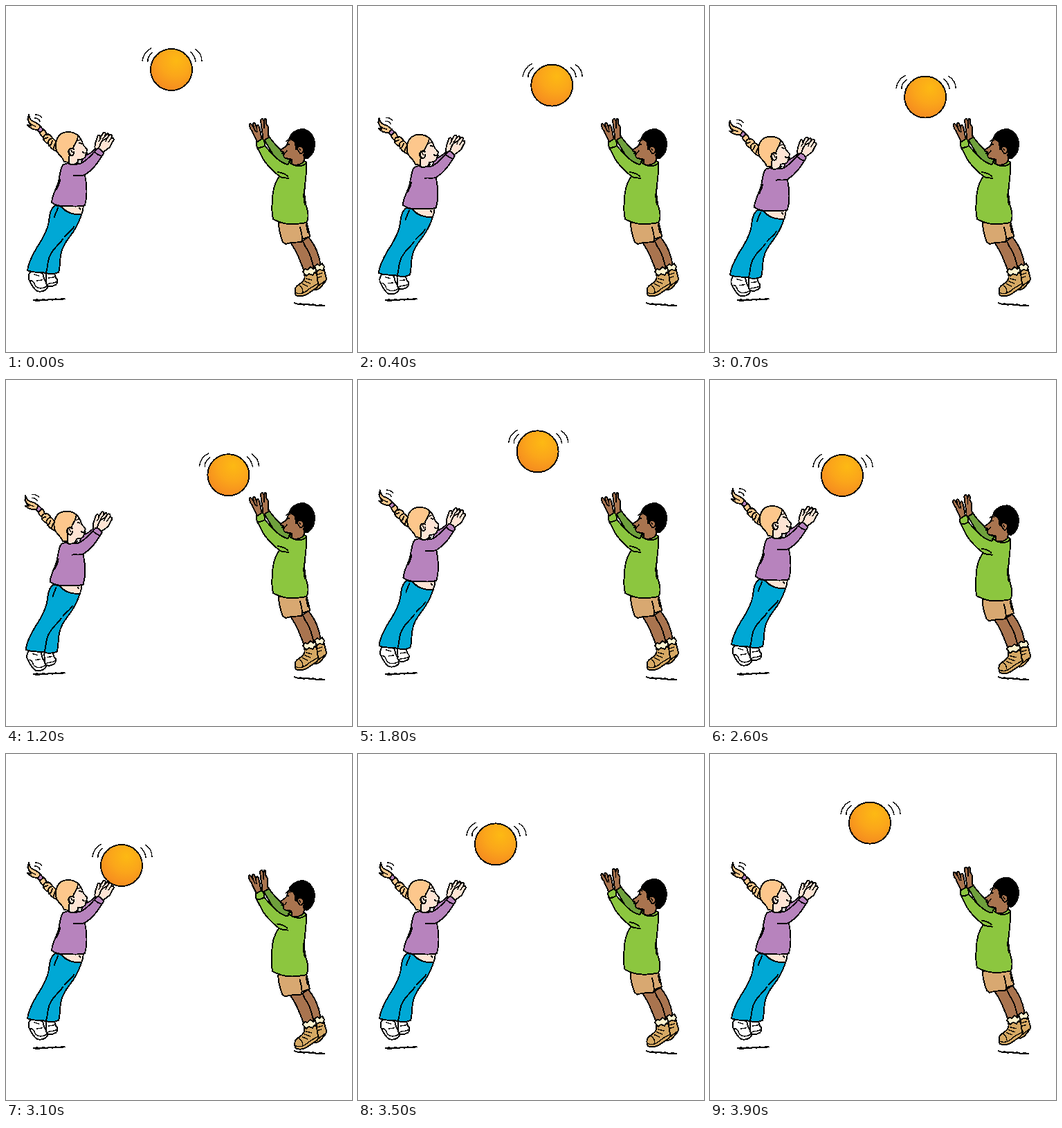
An HTML page that plays this animation: 500x500 px, repeating every 4000 ms.

```html
<!DOCTYPE html>
<html lang="en">
<head>
<meta charset="utf-8">
<title>Playing catch</title>
<style>
html, body { margin: 0; width: 100%; height: 100%; overflow: hidden; background: #fff; }
svg { display: block; width: 100vw; height: 100vh; shape-rendering: crispEdges; }
.ink { stroke: #000; stroke-width: 1.9; stroke-linecap: round; stroke-linejoin: round; fill: none; }
.thin { stroke-width: 1.4; }
.hair { fill: #fdc78c; }
.pale { fill: #fee4d4; }
.top { fill: #b783bd; }
.jeans { fill: #00a8d5; }
.white { fill: #fff; }
.brown { fill: #a9744f; }
.green { fill: #8cc63f; }
.shade { fill: #6fa03c; }
.tan { fill: #d8a871; }
.boot { fill: #d6a964; }
.sock { fill: #fff4cf; }
.black { fill: #000; }
</style>
</head>
<body>
<svg viewBox="0 0 500 500">
  <defs>
    <radialGradient id="glow" cx=".62" cy=".28" r=".75">
      <stop offset="0" stop-color="#fdb913"/>
      <stop offset=".5" stop-color="#fba61a"/>
      <stop offset="1" stop-color="#f58a20"/>
    </radialGradient>
  </defs>

  <g class="ink">
    <path d="M40 425L45 424L49 425.5L54 424L58 425L63 423.5L67 425L72 423L76 424.5L80 423L85 423.5M43 426L62 424.5L82 424"/>
    <path d="M417 429L422 431L426 430L430 432L435 430.5L439 432.5L444 431L449 433.5L454 432L460 433M420 430.5L440 431.5L457 433.5"/>
  </g>

  <g id="girl" class="ink">
    <path class="hair" d="M73 210C67 208 63 203 61 199C56 197 53 193 54 190C50 188 49 184 48 181L52 177C56 179 58 182 58 185C63 185 66 188 67 191C71 193 73 197 75 201Z"/>
    <path d="M54 190C55 187 57 185 60 186M61 199C60 195 63 192 67 191M55 192L60 190M62 202C65 202 66 198 67 195M68 207L71 199"/>
    <g id="tuft">
      <path class="top" d="M45 179L50 174L54 179L49 183Z"/>
      <path class="hair" d="M46 179C41 179 35 177 31 172L36 173C32 168 31 162 33 157C34 163 36 166 40 167C43 168 47 171 50 174Z"/>
      <path class="thin" d="M31 163C32 168 37 172 43 174M43 157C47 157 50 159 52 162M42 162C46 162 48 164 49 167"/>
    </g>
    <path class="pale" d="M79 288L112 287C112 292 111 297 109 302C98 302 85 298 79 288Z"/>
    <path d="M106 292L107.5 294"/>
    <path class="white" d="M36 383C33 387 31 392 34 397C37 403 40 409 45 412C51 414 58 411 60 407C61 401 56 398 55 394L53 386Z"/>
    <path class="white" d="M58 385C57 391 59 397 58 401C60 406 65 406 69 404C74 403 75 399 74 395C71 393 71 390 70 386Z"/>
    <path class="thin" d="M35 397C39 396 41 400 42 404C46 409 53 409 59 405M41 388L48 390M45 397L52 396M60 402C64 400 70 401 74 398M62 393L69 392"/>
    <path class="jeans" d="M71 288C64 293 63 302 62 311C60 325 52 338 44 350C37 362 32 372 31 382C39 386 49 384 58 386C64 388 71 387 76 385C79 376 77 366 80 356C83 342 92 335 98 325C103 317 107 309 109 301C99 302 86 299 80 290Z"/>
    <path d="M58 385C61 377 59 367 65 358C71 347 77 345 82 337M98 319C95 325 89 328 85 333M75 292C73 297 71 301 70 305"/>
    <path class="top" d="M112 217C120 215 126 210 131 204L137 212L120 229L108 229Z"/>
    <path class="pale" d="M129 208C127 201 130 195 133 187C135 186 137 187 136 191L140 184C143 181 145 184 143 188L147 184C149 185 148 189 146 192L138 210Z"/>
    <path class="pale" d="M133 208C136 202 136 197 140 194L146 191L150 186C153 185 154 188 152 191C156 190 157 193 154 196L150 204C147 207 143 208 139 213Z"/>
    <path class="thin" d="M146 191L144 196M152 191L148 197M137 191L134 196M143 188L139 193"/>
    <path class="top" d="M83 229C79 232 79 240 77 247C76 261 67 270 66 284C73 289 82 290 91 289C100 290 107 290 114 288C118 274 117 259 114 244C125 237 132 228 141 213C139 209 136 206 132 206C125 214 119 221 111 226C104 231 94 228 90 227Z"/>
    <path d="M114 244C108 246 103 244 98 245M78 251C78 256 75 261 73 265M128 211C131 214 135 216 138 217"/>
    <path class="pale" d="M104 187C108 191 110 195 111 199C112 203 116 205 117 207C118 209 115 210 117 212C117 214 115 214 115 216C115 220 110 222 104 222C105 226 100 230 93 229L86 219L91 198Z"/>
    <path class="hair" d="M104 187C97 181 87 181 81 184C73 188 70 200 73 209C76 216 82 218 84 225L91 226C92 222 90 219 92 216C88 209 92 204 97 206C98 199 104 196 104 187Z"/>
    <path class="pale" d="M98 207C92 203 89 210 93 215C96 218 99 214 98 211"/>
    <path class="thin" d="M94 208L96 212M104 195C106 193 108 193 110 195"/>
    <path d="M106 198L109 199M111 211C112 213 114 213 117 212"/>
    <path class="thin" d="M88 227C94 231 103 229 106 225"/>
  </g>

  <g id="boy" class="ink">
    <path class="boot" d="M447 382C448 391 445 398 443 408C447 412 453 409 456 405C459 400 464 398 463 393C461 388 461 383 459 379Z"/>
    <path class="thin" d="M446 407C453 406 455 400 463 396M449 393L456 391M450 388L457 386"/>
    <path class="brown" d="M426 341L437 334C444 342 449 352 452 362L455 375L446 381C442 369 438 358 432 350Z"/>
    <path class="sock" d="M445 377L450 373L453 375L457 372L460 377L458 382L453 381L448 384Z"/>
    <path class="boot" d="M431 388C434 397 425 401 420 405C417 408 417 414 419 418C425 421 433 419 439 414C444 410 451 408 452 402C449 396 450 391 449 386Z"/>
    <path class="thin" d="M418 414C426 418 432 414 438 409C442 405 448 404 452 400M432 398L440 401M434 394L442 396M429 402L436 405M424 404C427 406 429 409 429 413"/>
    <path class="brown" d="M411 342C417 350 421 358 424 366C427 373 429 378 431 384L445 381C443 371 441 361 436 353C433 349 431 345 429 340Z"/>
    <path class="sock" d="M429 384L432 380L436 381L440 377L444 380L447 378L449 386L446 385L443 389L438 387L434 390Z"/>
    <path class="tan" d="M394 313C394 323 397 333 400 341L404 344C412 341 419 342 427 341L428 337L439 333C438 326 436 319 434 311Z"/>
    <path d="M428 337C428 331 427 326 425 320M434 316L436 327"/>
    <path class="shade" d="M373 193L380 188C386 198 393 204 399 210L404 220L413 223L408 231L392 225Z"/>
    <path class="brown" d="M371 195C372 188 370 181 369 174L368 165C370 161 372 163 373 168L374 163C376 162 377 166 376 170L379 175C379 182 378 186 380 190Z"/>
    <path class="brown" d="M363 198C362 191 357 187 356 181C352 177 351 171 353 170C355 170 357 175 358 176L357 170C359 167 361 171 362 176C363 171 365 171 366 175C368 181 368 185 369 190L371 194Z"/>
    <path class="thin" d="M358 176L361 182M362 176L363 182M373 168L373 176"/>
    <path class="green" d="M362 197C360 202 366 209 370 218C374 227 386 239 395 246C387 257 385 269 385 281C384 290 384 299 386 308C394 312 401 315 410 315C419 316 427 314 434 313C437 309 437 303 436 297C432 284 430 272 432 260C433 249 435 236 434 226L428 221L410 224C407 226 410 229 407 229C394 226 384 213 374 202C374 197 373 193 370 192Z"/>
    <path d="M395 246C399 249 404 248 408 249M363 204C367 206 370 204 374 202M409 225C415 232 427 234 434 227M431 265C430 273 430 280 432 287M393 240C400 241 404 243 407 246"/>
    <path class="brown" d="M411 190C407 193 408 197 406 201C404 204 399 206 397 208C397 211 401 210 401 211L399 213L402 214C400 217 402 219 404 220C407 221 411 220 413 222C414 226 412 227 414 229C421 231 428 228 430 225L434 207L421 192Z"/>
    <path class="black" d="M410 190C412 183 421 178 430 178C440 180 446 190 446 200C446 209 442 216 436 220C433 221 432 219 430 216C432 210 431 205 427 204C423 203 421 204 419 207C418 201 419 196 415 194C413 194 411 193 410 190Z"/>
    <path class="brown" d="M421 207C421 201 428 202 430 206C431 210 428 214 425 213Z"/>
    <path class="thin" d="M424 206L426 209M405 196C406 193 409 193 411 195M400 213C403 213 405 211 406 209"/>
    <path d="M406 200L409 200"/>
  </g>

  <g id="ball" class="ink">
    <circle r="30" fill="url(#glow)"/>
    <path class="thin" d="M-42-13C-41-20 -37-27 -29-31M-34-12C-35-17 -32-21 -27-25M27-26C31-23 34-18 35-12M34-30C40-26 44-20 44-13"/>
  </g>
</svg>
<script>
const LOOP = 4000, STEP = 100;
const el = id => document.getElementById(id);
const girl = el("girl"), tuft = el("tuft"), boy = el("boy"), ball = el("ball");
const place = (node, value) => node.setAttribute("transform", value);

// Rises 0 to 1 and back over two seconds, beginning at `start`.
const swing = (t, start) => Math.max(0, 1 - Math.abs(t - start - 1000) / 1000);

function draw(ms) {
  const t = Math.floor((ms % LOOP) / STEP) * STEP;
  const right = swing(t, 0), left = swing(t, 2000);

  place(ball, `translate(${239 + 103 * right - 80 * left} ${92 + 56.5 * right + 76.7 * left})`);
  place(girl, `translate(${-3 * right} ${9.5 * right})`);
  place(tuft, `rotate(${-9 * right} 50 178)`);

  // The boy sinks and stretches slightly about his head.
  const sx = 1 + 0.012 * left, sy = 1 + 0.01 * left;
  place(boy, `translate(${460 * (1 - sx)} ${180 * (1 - sy) + 5.6 * left}) scale(${sx} ${sy})`);
}

const begin = performance.now();
function tick(now) {
  draw(Math.max(0, now - begin));
  requestAnimationFrame(tick);
}
draw(0);
requestAnimationFrame(tick);
</script>
</body>
</html>
```
